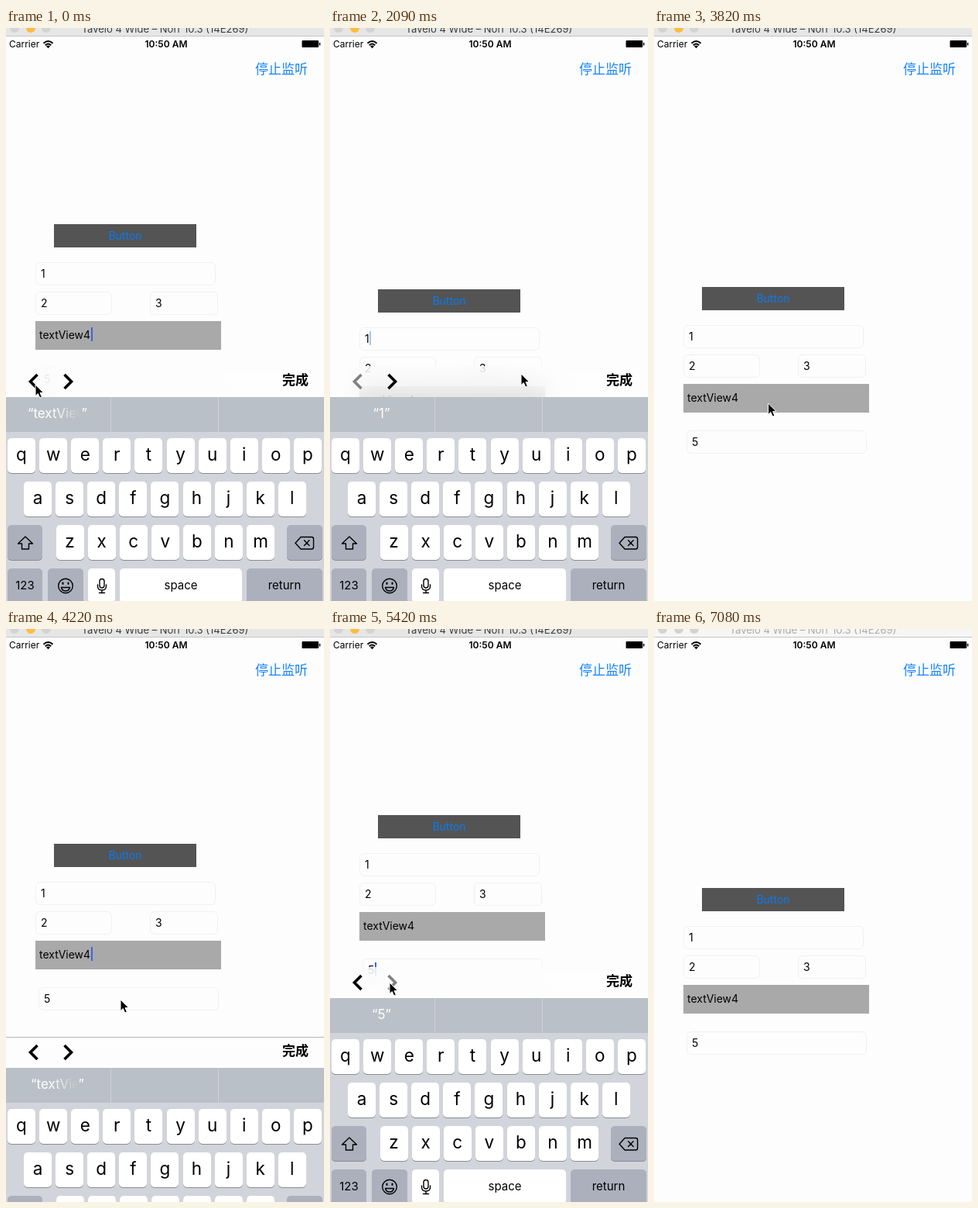
Recreate the animation shown at these times as an HTML page. Size 411 by 739 pixels, loop 7.13 s.

```html
<!DOCTYPE html>
<html lang="zh-CN">
<head>
<meta charset="utf-8">
<style>
html, body { margin: 0; width: 100%; height: 100%; overflow: hidden; background: #fdfdfd; }
#stage { position: relative; width: 411px; height: 739px; overflow: hidden; color: #000;
  font: 14px Inter, "Noto Sans CJK SC", sans-serif; }
#stage div, svg { position: absolute; box-sizing: border-box; white-space: pre; }
svg { overflow: visible; left: 0; top: 0; }
.field { border: 1px solid #f1f1f1; border-radius: 6px; padding-left: 6px; }
.key { border-radius: 5px; background: #fff; box-shadow: 0 1px 0 #898c92; text-align: center; }
.dark { background: #abb0bc; }
.mid { text-align: center; }
.zh { font: 17px "Noto Sans CJK SC", sans-serif; }
#word span { display: inline-block; vertical-align: top; overflow: hidden; }
</style>
</head>
<body>
<div id="stage"></div>
<script>
const stage = document.getElementById('stage');

function box(parent, x, y, w, h, css = '', text = '', cls = '') {
  const el = document.createElement('div');
  el.className = cls;
  el.style.cssText = `left:${x}px;top:${y}px;width:${w}px;height:${h}px;line-height:${h}px;${css}`;
  el.textContent = text;
  parent.append(el);
  return el;
}
function svg(parent, markup) {
  parent.insertAdjacentHTML('beforeend', `<svg width="411" height="303" fill="none" stroke="#000">${markup}</svg>`);
  return parent.lastElementChild;
}

// Form
const form = box(stage, 0, 0, 411, 250);
box(form, 62, 0, 184, 30, 'background:#545454;color:#0a7bf0', 'Button', 'mid');
for (const [x, y, w, text] of [[38, 49, 233, 1], [38, 87, 99, 2], [186, 87, 88, 3], [42, 185, 233, 5]]) {
  box(form, x, y, w, 30, 'line-height:28px', text, 'field');
}
box(form, 38, 125, 240, 37, 'background:#a9a9a9;padding-left:5px;line-height:35px', 'textView4');
const caret = box(form, 0, 0, 2, 18, 'background:#3566e2');

// Keyboard with its toolbar
const board = box(stage, 0, 436, 411, 310);
const bar = box(board, 0, 0, 411, 40,
  'background:rgba(254,254,254,.66);backdrop-filter:blur(16px);border-top:1px solid transparent');
const done = box(board, 357, 0, 40, 34, 'line-height:34px;font-weight:600', '完成', 'zh');
box(board, 0, 40, 411, 270, 'background:#d1d4db');
box(board, 0, 40, 411, 45, 'background:#bac0c8');
for (const x of [135, 274]) box(board, x, 40, 1, 45, 'background:#cdd2d8');
const word = box(board, 0, 40, 133, 42, 'color:#fff;font-size:17px', '', 'mid');
word.id = 'word';
word.innerHTML = '“<span></span>”';
const inner = word.querySelector('span');

function key(x, row, w, label = '', dark = false, css = 'font-size:15px;line-height:43px') {
  box(board, x, 93 + row * 56, w, 45, css, label, dark ? 'key dark' : 'key');
}
[['qwertyuiop', 2], ['asdfghjkl', 23], ['zxcvbnm', 64.5]].forEach(([letters, x0], row) =>
  [...letters].forEach((c, i) => key(x0 + i * 41.1, row, 36, c, false, 'font-size:22.5px;line-height:41px')));
key(2, 2, 45, '', true);
key(363, 2, 46, '', true);
key(2, 3, 45, '123', true);
key(54, 3, 46, '', true);
key(106, 3, 35);
key(147, 3, 158, 'space');
key(311, 3, 98, 'return', true);

const icons = svg(board, `
  <path class="chev" stroke-width="3.6" d="M40.5 11 31.5 20 40.5 29"/>
  <path class="chev" stroke-width="3.6" d="M75.500 11 84.500 20 75.500 29"/>
  <g stroke-width="1.4" stroke-linejoin="round" stroke-linecap="round">
    <path d="M25 220 34.500 229H29.500V236H20.500V229H15.500Z"/>
    <path d="M381 220.500H395Q397.500 220.500 397.500 223V233.500Q397.500 236 395 236H381L374 228.200Z
      M385.500 224.800 392 231.500M392 224.800 385.500 231.500"/>
    <circle cx="77" cy="283.500" r="9.300"/>
    <path d="M71.500 285.500H82.500Q81.500 290 77 290T71.500 285.500Z"/>
    <path stroke-width="2" d="M73.500 279.500V281M80.500 279.500V281"/>
    <rect x="121" y="274.500" width="6" height="11.500" rx="3"/>
    <path d="M118.500 282V284Q118.500 289 124 289T129.500 284V282M124 289V292.500M120.500 292.500H127.500"/>
  </g>`);
const [back, next] = icons.querySelectorAll('.chev');

// Window title, status bar, navigation
const title = box(stage, 0, 0, 411, 11, 'background:#ebebeb;border-bottom:1px solid #c6c6c6;overflow:hidden');
const caption = box(title, 0, -9, 411, 20, 'font-size:13px', 'Tavelo 4 Wide – Norr 10.3 (14E269)', 'mid');
const lights = [11, 32, 52].map(x => box(title, x - 6, -6, 12, 12, 'border-radius:50%'));
box(stage, 4, 11, 60, 20, 'font-size:12px', 'Carrier');
box(stage, 157, 11, 100, 20, 'font-size:12px;font-weight:600', '10:50 AM', 'mid');
svg(stage, `
  <path stroke-width="2" d="M48.500 19.800Q54.500 14.200 60.500 19.800M50.800 22.300Q54.500 18.800 58.200 22.300"/>
  <path fill="#000" stroke="none" d="M52 23.600Q54.500 21.600 57 23.600L54.500 26.200Z"/>
  <rect x="382.500" y="16" width="21.500" height="9" rx="1" fill="#000" stroke="none"/>
  <path stroke-width="1.500" d="M405.500 19V22.500"/>`);
box(stage, 322, 42, 80, 20, 'line-height:20px;color:#1583ff', '停止监听', 'zh');

const pointer = svg(stage,
  '<path d="M0 0V14.500L3.300 11.500 5.700 17 8.300 15.900 6 10.500H10.500Z" fill="#000" stroke="#fff"/>');

// Timeline
const LOOP = 7130;
const formY = [[-999, 253], [60, 299], [1500, 337], [3066, 334], [4052, 253], [5355, 201], [6325, 334]];
const boardY = [[-999, 0], [3066, 303], [4052, 0], [6325, 303]];
const focus = [[-200, '4'], [60, '3'], [770, '2'], [1500, '1'], [3066, ''], [4052, '4'], [5355, '5'], [6325, '']];
const caretAt = { 1: [51, 54], 2: [54, 92], 3: [202, 92], 4: [110, 133], 5: [58, 190] };
const mouse = [[0, 38, 460], [1600, 38, 460], [2090, 247, 446], [2260, 254, 449], [2600, 373, 460],
  [2840, 358, 460], [3240, 358, 460], [3700, 147, 491], [3930, 148, 478], [4230, 148, 478],
  [4560, 304, 525], [4830, 150, 489], [5190, 77, 456], [5450, 77, 456], [6000, 365, 450],
  [6450, 365, 450], [6750, 425, 640], [LOOP, 425, 640]];

const clamp = v => Math.min(1, Math.max(0, v));
const between = (t, a, b) => t >= a && t < b;
const latest = (track, t) => track.filter(k => k[0] <= t).pop();

// Critically damped spring between successive rest positions
function spring(track, t) {
  const i = track.indexOf(latest(track, t));
  if (!i) return track[0][1];
  const s = (t - track[i][0]) * 0.0145;
  return track[i][1] + (track[i - 1][1] - track[i][1]) * (1 + s) * Math.exp(-s);
}

function mouseAt(t) {
  const i = mouse.findIndex(k => k[0] > t);
  const [t0, x0, y0] = mouse[i - 1], [t1, x1, y1] = mouse[i];
  const u = (t - t0) / (t1 - t0), e = u * u * (3 - 2 * u);
  return [x0 + (x1 - x0) * e, y0 + (y1 - y0) * e];
}

function showWord(text, p) {
  inner.textContent = text;
  inner.style.width = 'auto';
  const full = inner.offsetWidth;
  inner.style.width = p < 1 ? 10 + (full - 10) * p + 'px' : 'auto';
  inner.style.maskImage = p < 1 ? `linear-gradient(90deg, #000 ${p * 60}%, transparent 98%)` : 'none';
}

function draw(t) {
  // Whole pixels keep edges and text crisp while sliding
  form.style.transform = `translateY(${Math.round(spring(formY, t))}px)`;
  const shift = Math.round(spring(boardY, t));
  board.style.transform = `translateY(${shift}px)`;
  bar.style.borderTopColor = shift > 3 ? '#b6b6b6' : 'transparent';

  const [since, field] = latest(focus, t);
  const [cx, cy] = caretAt[field] || [0, 0];
  const phase = (t - since) % 1000;
  caret.style.left = cx + 'px';
  caret.style.top = cy + 'px';
  caret.style.opacity = field ? clamp(Math.max((650 - phase) / 150, (phase - 850) / 150)) : 0;

  // The suggestion lags a little behind the first change and stays while hiding
  const last = latest(focus.filter(k => k[1]), between(t, 0, 110) ? 0 : t);
  const isLong = last[1] === '4';
  showWord(isLong ? 'textView4' : last[1], isLong ? clamp((t - last[0]) / 270) : 1);
  back.setAttribute('stroke', last[1] === '1' ? '#808080' : '#000');
  next.setAttribute('stroke', last[1] === '5' ? '#808080' : '#000');
  done.style.color = between(t, 3020, 3700) || t >= 6170 ? '#808080' : '#000';

  const active = t < 7080;
  title.style.background = active ? '#e6e6e6' : '#f6f6f6';
  caption.style.color = active ? '#3c3c3c' : '#aaa';
  lights.forEach((el, i) => el.style.background = active && i === 1 ? '#fdbc40' : '#d3d3d3');

  const [mx, my] = mouseAt(t);
  pointer.style.transform = `translate(${mx}px, ${my}px)`;
}

const start = performance.now();
(function tick() {
  draw((performance.now() - start) % LOOP);
  requestAnimationFrame(tick);
})();
</script>
</body>
</html>
```
